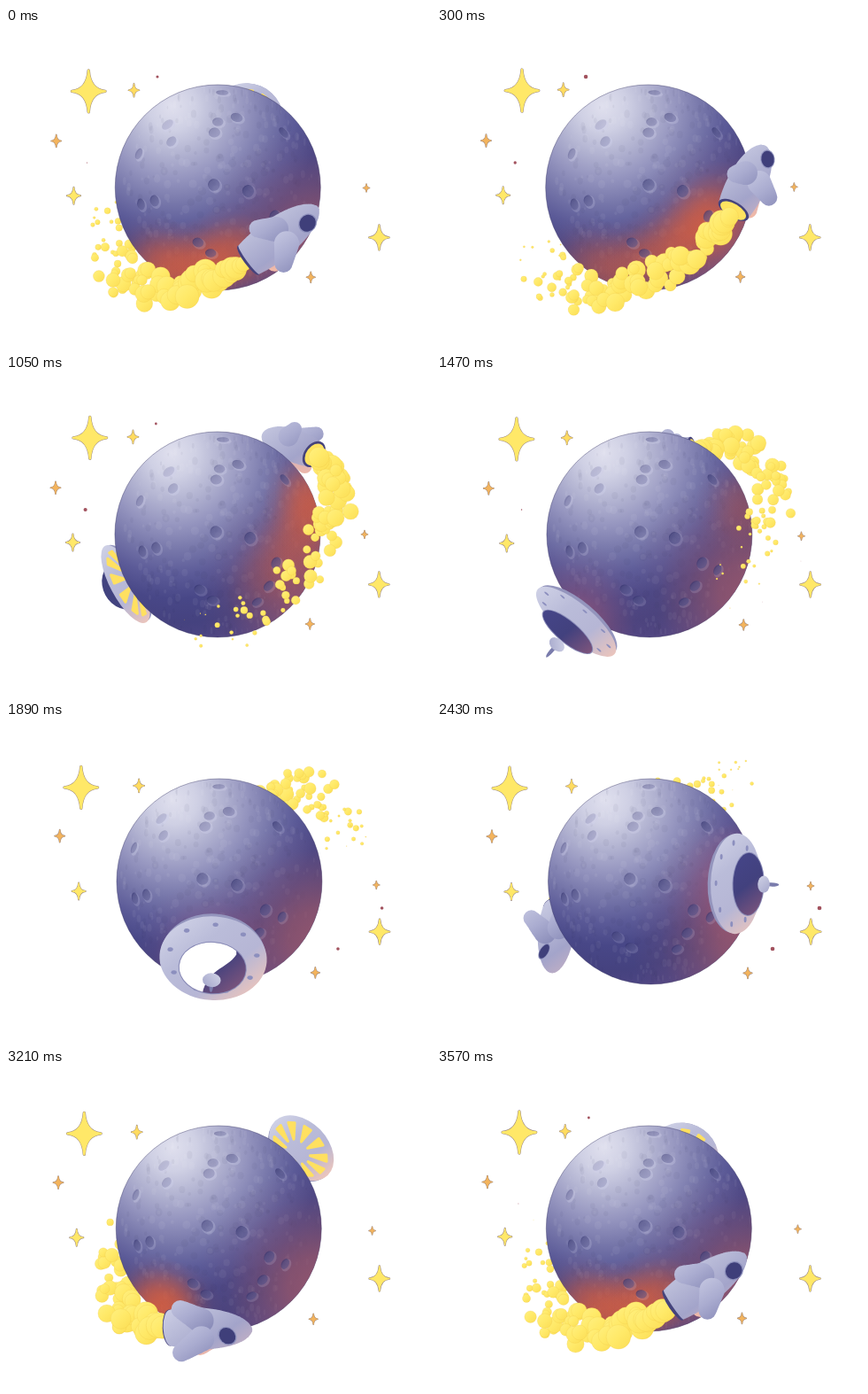
An HTML page with a canvas for the animation above (3.6 s loop, 480x360 px).

```html
<!DOCTYPE html>
<html lang="en">
<head>
<meta charset="utf-8">
<title>Moon orbit</title>
<style>
html, body { margin: 0; width: 100%; height: 100%; overflow: hidden; background: #fff; }
canvas { display: block; width: 480px; height: 360px; }
</style>
</head>
<body>
<canvas id="stage" width="480" height="360"></canvas>
<script>
const ctx = document.getElementById('stage').getContext('2d');
const LOOP = 3600, STEP = 30, TAU = Math.PI * 2;
const CX = 240, CY = 180, R = 116, SWAY = 0.112;

// Shared orbit: centre plus two axes; z points at the viewer
const MID = [8, -4, 0], AXIS_A = [113, -60, 0], AXIS_B = [2, -95, -85];

// Key craters, x and y
const CRATERS = [
  [228, 106], [223, 118], [250, 101], [239, 73], [174, 109], [176, 128], [143, 142], [220, 177],
  [259, 184], [144, 199], [157, 195], [305, 118], [291, 212], [310, 220], [284, 238], [272, 256],
  [205, 242], [220, 254]
];
// x, y, depth, half height
const STARS = [
  [89.5, 72.5, 7.5, 23.5], [147, 71, -5, 7.5], [58.5, 128, -3.5, 7], [79, 190, -5, 9.5],
  [421.7, 236.5, -.5, 14], [412, 182, -10, 4.5], [346.5, 282, -4.5, 6]
];
// x, y, depth, time of brightest moment
const DOTS = [[175, 55, -8, 500], [96, 152, -9, 750], [412, 210, -20, 2300], [368, 256, -11, 2300]];

const mod = (v, m) => ((v % m) + m) % m;
const cross = (a, b) => [a[1] * b[2] - a[2] * b[1], a[2] * b[0] - a[0] * b[2], a[0] * b[1] - a[1] * b[0]];
const unit = a => { const l = Math.hypot(...a); return a.map(v => v / l); };
const mix = (a, p, b, q) => a.map((v, i) => v * p + b[i] * q);
const neg = a => a.map(v => -v);
const rand = n => mod(Math.sin(n * 127.1 + 11.7) * 43758.5453, 1);
const phase = (t, t0) => (t - t0) / LOOP * TAU;

const depthScale = z => 1 + z / 600;
const project = p => [CX + p[0] * depthScale(p[2]), CY + p[1] * depthScale(p[2])];
const orbit = (a, k = 1) => mix(MID, 1, mix(AXIS_A, Math.cos(a), AXIS_B, Math.sin(a) * k), 1);
const NORMAL = unit(cross(AXIS_A, AXIS_B));

function ellipse(x, y, rx, ry, angle, fill) {
  ctx.beginPath();
  ctx.ellipse(x, y, Math.max(rx, 0), Math.max(ry, 0), angle, 0, TAU);
  ctx.fillStyle = fill;
  ctx.fill();
}

function addStops(g, colours) {
  colours.forEach((c, i) => g.addColorStop(i / (colours.length - 1), c));
  return g;
}

const linear = (x0, y0, x1, y1, ...colours) => addStops(ctx.createLinearGradient(x0, y0, x1, y1), colours);

function glow(x, y, r, rgb, alpha) {
  const stops = [1, .85, .45, .12, 0].map(k => `rgba(${rgb},${alpha * k})`);
  ellipse(x, y, r, r, 0, addStops(ctx.createRadialGradient(x, y, 0, x, y, r), stops));
}

/* Stars */
function drawStar(x, y, h) {
  const w = h * .8;
  ctx.beginPath();
  ctx.moveTo(x, y - h);
  [[1, 0], [0, 1], [-1, 0], [0, -1]].forEach(([px, py], i) => {
    const qx = i < 2 ? 1 : -1, qy = i === 1 || i === 2 ? 1 : -1;
    ctx.quadraticCurveTo(x + qx * w * .08, y + qy * w * .08, x + px * w, y + py * h);
  });
  ctx.closePath();
  ctx.lineJoin = 'round';
  ctx.fillStyle = ctx.strokeStyle = h > 9 ? '#ffe868' : h > 7.2 ? '#ffdc60' : '#f4b45c';
  const edge = ctx.strokeStyle;
  ctx.strokeStyle = 'rgba(92,60,52,.6)';
  ctx.lineWidth = h * .1 + 1;
  ctx.stroke();
  ctx.strokeStyle = edge;
  ctx.lineWidth = h * .1;
  ctx.stroke();
  ctx.fill();
}

function drawStars(t, sway) {
  STARS.forEach(([x, y, depth, h]) => drawStar(x + depth * sway, y - Math.abs(depth) * .3 * sway, h));
  DOTS.forEach(([x, y, depth, peak]) => {
    const r = 2.4 * Math.max(0, Math.cos(phase(t, peak)));
    ellipse(x + depth * sway, y, r, r, 0, '#a2525e');
  });
}

/* Moon */
function onMoon(x, y, turn) {
  const ring = Math.sqrt(R * R - (y - CY) ** 2);
  const lon = Math.asin((x - CX) / ring) + turn;
  return { x: CX + ring * Math.sin(lon), y, z: ring * Math.cos(lon) / R };
}

function drawCrater(x, y, r, turn) {
  const p = onMoon(x, y, turn);
  const a = Math.atan2(p.y - CY, p.x - CX);
  const shade = Math.min(1, Math.hypot(p.x - 185, p.y - 95) / 120);
  const rx = r * Math.max(.35, p.z);
  ellipse(p.x + 1.5, p.y + 1.5, rx, r, a, `rgba(205,206,232,${.5 - shade * .32})`);
  const dark = .14 + shade * .56;
  ellipse(p.x, p.y, rx * .86, r * .86, a,
    linear(p.x - r, p.y - r, p.x + r, p.y + r, `rgba(42,42,100,${dark})`, `rgba(80,80,140,${dark * .5})`));
}

function drawMoon(t, sway) {
  const turn = SWAY * (sway + .707);
  ctx.save();
  ctx.translate(-1.5 * sway, 0);
  ellipse(CX, CY, R, R, 0, addStops(ctx.createRadialGradient(188, 88, 0, 195, 92, 215),
    ['#e0e0ee', '#cfd0e4', '#b2b3d1', '#9595bf', '#7777aa', '#5c5b98', '#484787', '#45427f', '#4f4684']));
  ctx.strokeStyle = 'rgba(52,48,96,.5)';
  ctx.lineWidth = .8;
  ctx.stroke();
  ctx.clip();

  for (let i = 0; i < 420; i++) {
    const y = CY + (rand(i) * 2 - 1) * 112;
    const ring = Math.sqrt(R * R - (y - CY) ** 2);
    const p = onMoon(CX + (rand(i + 500) * 2 - 1) * ring * .96, y, turn);
    const r = 1.5 + 3.5 * rand(i + 1000);
    ellipse(p.x, p.y, r * p.z, r, 0, i % 2 ? 'rgba(255,255,255,.05)' : 'rgba(40,40,90,.05)');
  }

  glow(352, 245, 135, '160,88,104', .8);
  for (let age = 0; age < 1000; age += 80) {
    if (!inFront(t - age)) continue;
    const [x, y] = rocketAt(t - age).at(-53);
    glow(CX + (x - CX) * .82, CY + (y - CY) * .82, 56, '232,98,56', .42 * (1 - age / 1150));
  }
  const s = saucerAt(t);
  if (s.front) glow(s.x, s.y, 90, '190,96,118', .5);
  CRATERS.forEach(([x, y], i) => drawCrater(x, y, 7 + 2 * rand(i + 30), turn));
  ctx.restore();
}

/* Rocket */
const inFront = t => Math.cos(phase(t, 60)) > .24;

function rocketAt(t) {
  const a = phase(t, 600), pos = orbit(a);
  // The nose trails the path a little in the near and far stretches
  const h = a - .38 * Math.sin(a) ** 2;
  const u = unit(mix(AXIS_A, -Math.sin(h), AXIS_B, Math.cos(h)));
  const roll = .7 * Math.max(0, -Math.cos(a)), side = cross(NORMAL, u);
  const b = mix(NORMAL, Math.cos(roll), side, -Math.sin(roll));
  const n = mix(side, Math.cos(roll), NORMAL, Math.sin(roll));
  // Point at distance s along the axis and d towards v
  const at = (s, v = u, d = 0) => project(mix(pos, 1, mix(u, s, v, d), .9));
  return { u, b, n, at, scale: .9 * depthScale(pos[2]) };
}

function drawFin(r, dir, pink) {
  const path = new Path2D();
  for (let i = 0; i <= 16; i++) {
    const k = i / 16, [x, y] = r.at(-18 * k - 2, dir, 14 + 19 * k), rad = (14 - 4 * k) * r.scale;
    path.moveTo(x + rad, y);
    path.arc(x, y, rad, 0, TAU);
  }
  const [x, y] = r.at(-12, dir, 24);
  ctx.fillStyle = pink ? linear(x, y - 18, x, y + 18, '#c3aac4', '#f0b9a8')
    : linear(x - 14, y - 20, x + 14, y + 20, '#c2c4df', '#aaacd0', '#8c8eba');
  ctx.fill(path);
}

function drawNozzle(r) {
  const a = Math.atan2(r.u[1], r.u[0]), rad = 20 * r.scale, rx = rad * Math.abs(r.u[2]);
  ellipse(...r.at(-46), Math.max(5, rx), rad, a, '#45437c');
  if (r.u[2] < -.2) ellipse(...r.at(-47), rx * .84, rad * .84, a, '#ffe360');
}

function drawBody(r) {
  const a = Math.atan2(r.u[1], r.u[0]), path = new Path2D();
  for (let i = 0; i <= 90; i++) {
    const v = i / 90 * 1.04, [x, y] = r.at(-45 + 93 * v);
    const rad = 23 * Math.sqrt(1 - ((v - .35) / .7) ** 2) * r.scale;
    const rx = Math.max(rad * Math.abs(r.u[2]), 2);
    path.moveTo(x + rx * Math.cos(a), y + rx * Math.sin(a));
    path.ellipse(x, y, rx, rad, a, 0, TAU);
  }
  const [x, y] = r.at(0);
  ctx.fillStyle = linear(x - 22, y - 34, x + 26, y + 34, '#c9cbe3', '#b6b8d6', '#a3a4ca', '#c4b0c4');
  ctx.fill(path);

  const w = unit(mix(r.n, -.93, r.b, -.37));
  if (w[2] < .1 || r.u[2] < -.5) return;
  const [wx, wy] = r.at(30, w, 14), wa = Math.atan2(w[1], w[0]), rad = 11 * r.scale;
  ellipse(wx, wy, rad * w[2], rad, wa, '#8f92bd');
  ellipse(wx, wy, rad * .88 * w[2], rad * .88, wa, '#3f3f7a');
}

function drawRocket(r) {
  const fins = [[r.b, true], [neg(r.b)], [neg(r.n)]].sort((p, q) => p[0][2] - q[0][2]);
  const away = r.u[2] < -.2;
  fins.filter(f => f[0][2] <= 0).forEach(f => drawFin(r, ...f));
  if (!away) drawNozzle(r);
  drawBody(r);
  fins.filter(f => f[0][2] > 0).forEach(f => drawFin(r, ...f));
  if (away) drawNozzle(r);
}

/* Exhaust */
const PUFFS = 260, LIFE = 1250;

function drawPuffs(t, front) {
  const gap = LOOP / PUFFS, last = Math.floor(t / gap);
  for (let i = last - Math.floor(LIFE / gap); i <= last; i++) {
    const born = i * gap, id = mod(i, PUFFS), age = (t - born) / LIFE;
    if (age >= 1 || inFront(born) !== front) continue;
    const rocket = rocketAt(born), [px, py] = rocket.at(-53);
    const a = rand(id) * TAU;
    const spread = (13 + 20 * age) * Math.min(1, age * 7) * Math.sqrt(rand(id + 300));
    const out = 14 * age / Math.hypot(px - CX, py - CY);
    const x = px + Math.cos(a) * spread + (px - CX) * out;
    const y = py + Math.sin(a) * spread + (py - CY) * out;
    const r = 15.5 * rocket.scale * (1 - age) ** .75 * (.5 + .5 * rand(id + 700));
    ellipse(x, y, r, r, 0, linear(x - r, y - r, x + r, y + r, '#fff080', '#ffe968', '#fbdd55'));
    ctx.strokeStyle = 'rgba(232,190,60,.25)';
    ctx.lineWidth = .8;
    ctx.stroke();
  }
}

function drawShip(t, front) {
  const rocket = rocketAt(t), here = inFront(t) === front, away = rocket.u[2] < -.2;
  if (here && away) drawRocket(rocket);
  drawPuffs(t, front);
  if (here && !away) drawRocket(rocket);
}

/* Saucer */
function saucerAt(t) {
  const pos = orbit(phase(t, 2850), .8), [x, y] = project(pos), d = unit(pos);
  return { x, y, n: unit([d[0], d[1], d[2] * 1.9 - .35]), r: 49 * depthScale(pos[2]) ** 2, front: pos[2] > 15 };
}

function drawTop(r, side, face, angle, lx, ly) {
  for (let i = 0; i < 9; i++) {
    const q = i / 9 * TAU + .35;
    ellipse(Math.cos(q) * r * .82 * face, Math.sin(q) * r * .82, 3 * face, 3.2, 0, '#8c8fbe');
  }
  const dx = r * .28 * side, rx = r * .62 * face, ry = r * .62, kx = r * .63 * side;
  ellipse(dx, 0, rx + 1, ry + 1, 0, '#8a8cb8');
  ellipse(dx, 0, rx, ry, 0, linear(dx - lx * .6, -ly * .6, dx + lx * .6, ly * .6, '#454588', '#42417e', '#7c547c'));
  if (face > .72) {
    // Clear glass while the dome looks straight out
    ctx.save();
    ctx.clip();
    ctx.translate(dx, 0);
    ctx.rotate(-angle);
    ctx.beginPath();
    ctx.moveTo(-50, -50);
    ctx.lineTo(27, -50);
    ctx.lineTo(27, -15);
    ctx.bezierCurveTo(14, 4, -10, 0, -13, 40);
    ctx.lineTo(-50, 40);
    ctx.fillStyle = '#fff';
    ctx.fill();
    ctx.restore();
  }
  ellipse(kx + r * .17 * side, 0, r * .18 * side, 2.2, 0, '#7a7cac');
  ellipse(kx, 0, r * .17 * Math.max(face, .7), r * .17, 0, linear(kx - 8, -8, kx + 8, 8, '#d0d2e6', '#a5a7cb'));
}

function drawUnderside(r, side, face) {
  const hub = -r * .28 * side;
  ctx.clip();
  ctx.lineJoin = 'round';
  ctx.fillStyle = ctx.strokeStyle = '#ffe060';
  ctx.lineWidth = 3;
  for (let i = 0; i < 10; i++) {
    const q = i / 10 * TAU + .3;
    const spot = (v, w) => ctx.lineTo(hub * (1 - v) + Math.cos(q + w) * r * v * face, Math.sin(q + w) * r * v);
    ctx.beginPath();
    spot(.38, 0);
    spot(.82, -.13);
    spot(.82, .13);
    ctx.closePath();
    ctx.fill();
    ctx.stroke();
  }
}

function drawSaucer({ x, y, n, r }) {
  const side = Math.hypot(n[0], n[1]), face = Math.abs(n[2]), top = n[2] > 0;
  const angle = Math.atan2(n[1], n[0]);
  // Light falls from the top left of the stage
  const lx = Math.cos(.9 - angle) * r, ly = Math.sin(.9 - angle) * r;
  ctx.save();
  ctx.translate(x, y);
  ctx.rotate(angle);
  if (!top) ellipse(0, 0, r * .56 * side, r * .6, 0, '#42437f');
  ellipse(-r * .05 * side, 0, r * face + 2, r * .98, 0, '#9495bd');
  ellipse(0, 0, r * face + 1, r, 0, linear(-lx, -ly, lx, ly, '#cfd1e6', '#babcd9', '#b6b6d5', '#ecc5bc'));
  if (top) drawTop(r, side, face, angle, lx, ly);
  else drawUnderside(r, side, face);
  ctx.restore();
}

function draw(t) {
  const sway = Math.cos(phase(t, 600)), saucer = saucerAt(t);
  ctx.clearRect(0, 0, 480, 360);
  drawStars(t, sway);
  if (!saucer.front) drawSaucer(saucer);
  drawShip(t, false);
  drawMoon(t, sway);
  drawShip(t, true);
  if (saucer.front) drawSaucer(saucer);
}

const start = performance.now();
function tick() {
  const t = mod(performance.now() - start, LOOP);
  draw(Math.floor(t / STEP) * STEP);
  requestAnimationFrame(tick);
}
tick();
</script>
</body>
</html>
```
